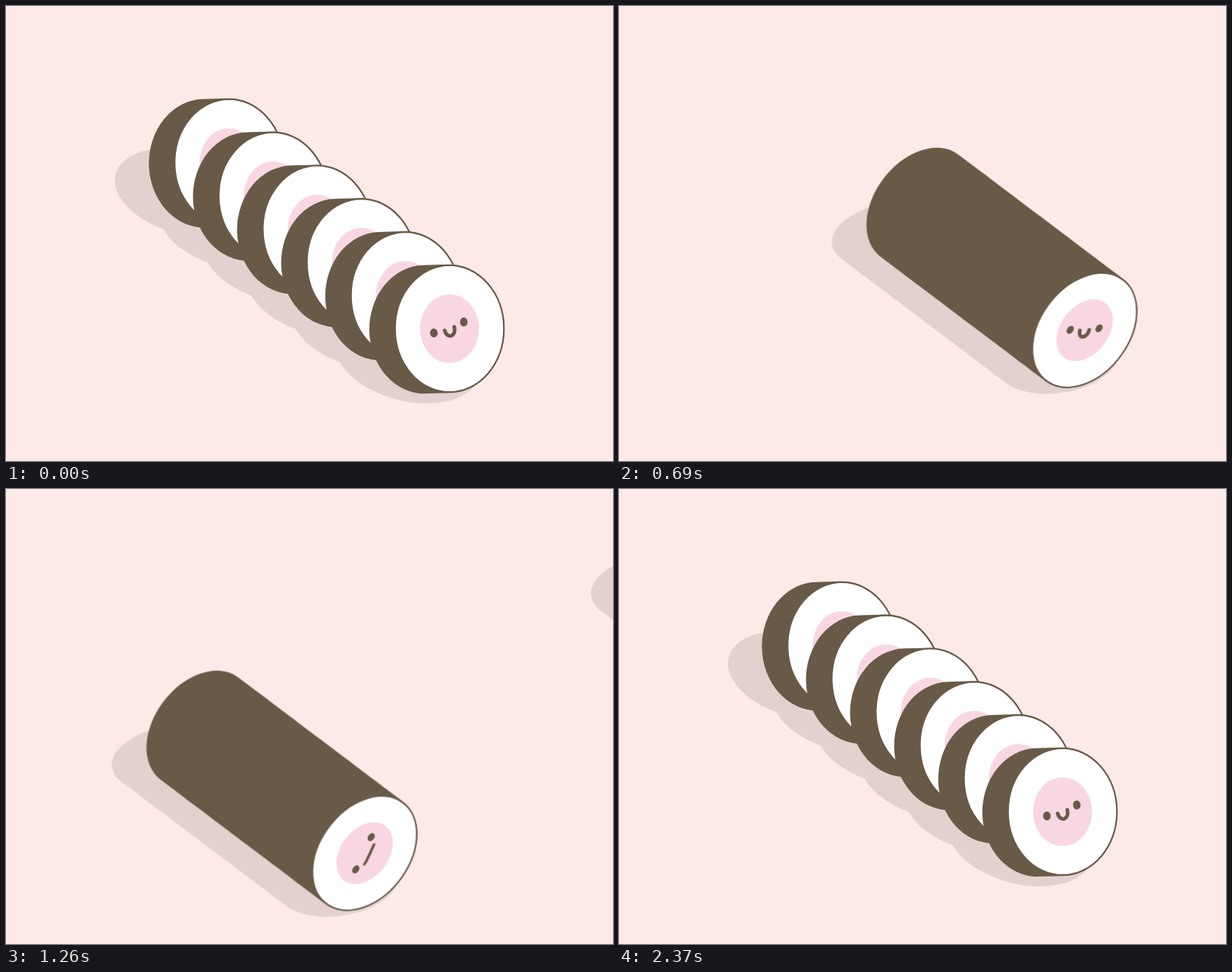
Write an HTML page without scripts that moves like this. It is 800 px wide and 600 px high and loops after 2.43 s.

```html
<!DOCTYPE html>
<html lang="en">
<head>
<meta charset="utf-8">
<title>Sushi roll</title>
<style>
  /* fold: slices face sideways; join: gaps closed; flat: straight mouth */
  @property --fold { syntax: "<number>"; inherits: true; initial-value: 0; }
  @property --join { syntax: "<number>"; inherits: true; initial-value: 0; }
  @property --flat { syntax: "<number>"; inherits: true; initial-value: 0; }
  @property --turn { syntax: "<angle>"; inherits: true; initial-value: -17.5deg; }

  html, body { margin: 0; width: 100%; height: 100%; overflow: hidden; background: #fde9e7; }
  svg {
    --nori: #685a47;
    display: block;
    width: 800px;
    height: 600px;
    animation: 2430ms ease-in-out infinite;
    animation-name: fold, join, flat, turn;
  }

  .slot {
    transform:
      translate(calc(584.5px + 2.5px * var(--fold) - 2px * var(--join)),
                calc(425.5px + 11.5px * var(--fold) + .5px * var(--join)))
      translate(calc(var(--i) * (21.8px * var(--join) - 58.1px)),
                calc(var(--i) * (16.4px * var(--join) - 43.8px)));
  }
  .tilt {
    transform: skewY(calc(-20deg * var(--fold)))
      scale(calc(1.024 - .043 * var(--fold)), calc(1.193 - .18 * var(--fold)));
  }
  .shade {
    transform:
      translate(calc(20.1px * var(--fold) - 55.5px), 39.6px)
      skewY(calc(9.6deg - 15.5deg * var(--fold)))
      scale(calc(1.1875 - .1875 * var(--fold)), calc(.709 - .165 * var(--fold)));
  }

  /* A single round-capped dash sweeps a disc along its depth. */
  .body, .shade-body { fill: none; stroke-linecap: round; }
  .body {
    stroke: var(--nori);
    stroke-width: 142px;
    stroke-dasharray: calc(32.2px + 22.4px * var(--fold)) 999px;
    transform: rotate(calc(178.6deg + 48.7deg * var(--fold)));
  }
  .shade-body {
    stroke: #e3d1d0;
    stroke-width: 160px;
    stroke-dasharray: calc(.1px + 67.7px * var(--fold)) 999px;
    transform: rotate(237.6deg);
  }
  .rice { fill: #fff; stroke: var(--nori); stroke-width: 2px; vector-effect: non-scaling-stroke; }
  .filling { fill: #f9d7e2; }
  .face { fill: var(--nori); transform: rotate(var(--turn)); }
  .mouth {
    fill: none;
    stroke: var(--nori);
    stroke-width: 4.8px;
    stroke-linecap: round;
    vector-effect: non-scaling-stroke;
    transform: translateY(calc(7.3px * var(--flat)))
      scale(calc(1 + .74 * var(--flat)), calc(1 - .95 * var(--flat)));
  }
  .leaving { animation: leaving 2430ms linear infinite; }
  .arriving { animation: arriving 2430ms linear infinite; }

  @keyframes fold {
    0%, 74.074%, 100% { --fold: 0; }
    9.877%, 62.963% { --fold: 1; }
  }
  @keyframes join {
    0%, 74.074%, 100% { --join: 0; }
    9.877% { --join: 0; animation-timing-function: cubic-bezier(.33, 0, .67, .33); }
    22.222%, 62.963% { --join: 1; }
  }
  @keyframes flat {
    0%, 39.917%, 74.074%, 100% { --flat: 0; }
    39.918%, 62.963% { --flat: 1; }
  }
  @keyframes turn {
    0% { --turn: -17.5deg; }
    9.877% { --turn: 0deg; }
    22.222% { --turn: 0deg; animation-timing-function: cubic-bezier(.33, 0, .67, .33); }
    37.037% { --turn: 96deg; animation-timing-function: linear; }
    45.679% { --turn: 215.6deg; animation-timing-function: cubic-bezier(.35, .5, .65, 1); }
    60.494%, 62.963% { --turn: 360deg; }
    74.074%, 100% { --turn: 342.5deg; }
  }
  @keyframes leaving {
    0% { transform: translate(0, 0); }
    22.222% { transform: translate(0, 0); animation-timing-function: cubic-bezier(.33, 0, .67, .33); }
    37.037% { transform: translate(163px, -57px); }
    45.679% { transform: translate(368px, -130px); }
    54.321% { transform: translate(578px, -204px); animation-timing-function: step-start; }
    100% { transform: translate(900px, -204px); }
  }
  @keyframes arriving {
    0%, 29.63% { transform: translate(-691px, 252px); }
    37.037% { transform: translate(-505px, 186px); }
    45.679% { transform: translate(-274px, 104px); animation-timing-function: cubic-bezier(.35, .5, .65, 1); }
    60.494%, 100% { transform: translate(0, 0); }
  }
</style>
</head>
<body>
<svg viewBox="0 0 800 600">
  <defs>
    <g id="shadow">
      <g class="shade"><path class="shade-body" d="M0 0H200"/></g>
    </g>
    <g id="slice">
      <g class="tilt">
        <path class="body" d="M0 0H200"/>
        <circle class="rice" r="70"/>
        <circle class="filling" r="38"/>
      </g>
    </g>
    <g id="roll">
      <use href="#shadow" class="slot" style="--i:5"/>
      <use href="#shadow" class="slot" style="--i:4"/>
      <use href="#shadow" class="slot" style="--i:3"/>
      <use href="#shadow" class="slot" style="--i:2"/>
      <use href="#shadow" class="slot" style="--i:1"/>
      <use href="#shadow" class="slot" style="--i:0"/>
      <use href="#slice" class="slot" style="--i:5"/>
      <use href="#slice" class="slot" style="--i:4"/>
      <use href="#slice" class="slot" style="--i:3"/>
      <use href="#slice" class="slot" style="--i:2"/>
      <use href="#slice" class="slot" style="--i:1"/>
      <use href="#slice" class="slot" style="--i:0"/>
      <g class="slot" style="--i:0">
        <g class="tilt">
          <g class="face">
            <circle cx="-20.6" cy="-1.5" r="4.9"/>
            <circle cx="19.8" cy="-1.5" r="4.9"/>
            <path class="mouth" d="M-6.5 0C-6.5 10.8 6.5 10.8 6.5 0"/>
          </g>
        </g>
      </g>
    </g>
  </defs>
  <use href="#roll" class="leaving"/>
  <use href="#roll" class="arriving"/>
</svg>
</body>
</html>
```
